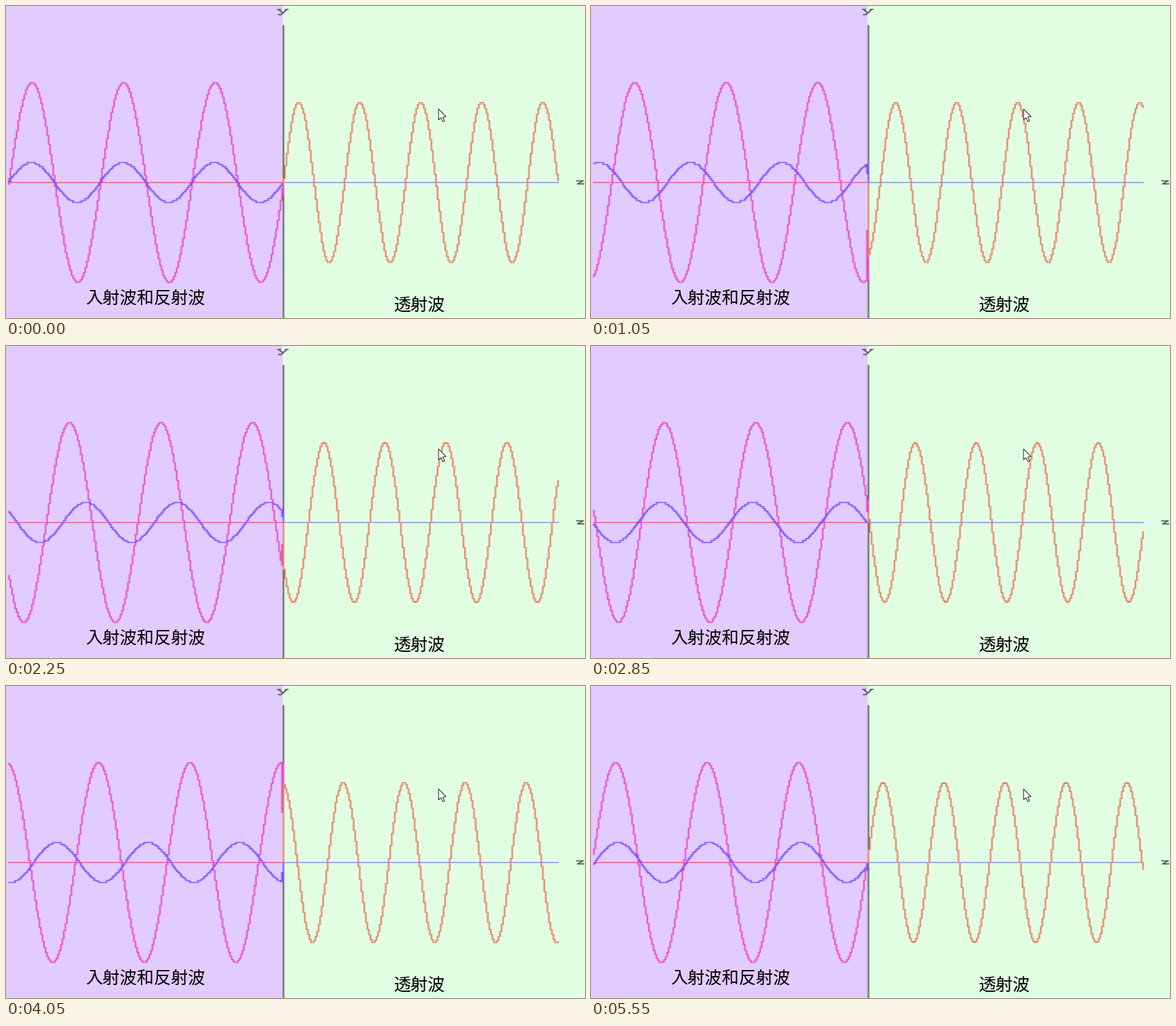
A matplotlib script that plays this animation: 846 px wide and 456 px high, repeating every 5.7 s.

```python
import numpy as np
import matplotlib.pyplot as plt
from matplotlib.animation import FuncAnimation
from matplotlib.patches import Polygon

W, H, DPI = 846, 456, 96
COLS, ROWS = 380, 312          # coarse plotting grid, enlarged to the stage
LEFT, MID, RIGHT = 1, 181, 361  # columns: start, interface, end
ZERO = 176                     # row of the z axis
TICKS, TICK_MS = 38, 150

PURPLE = (226, 203, 254)
GREEN = (226, 254, 226)
AXIS = (92, 112, 96)
RED = (232, 80, 128)
AXIS_BLUE = (122, 134, 222)
PINK = (232, 78, 204)
BLUE = (122, 84, 255)
ORANGE = (226, 130, 102)


def vline(img, col, a, b, color):
    lo, hi = sorted((int(round(a)), int(round(b))))
    img[lo:hi + 1, col] = color


def trace(img, first, rows, color):
    """Connect one row per column; each jump is split between neighbours."""
    mids = (rows[:-1] + rows[1:]) / 2
    before = np.concatenate(([rows[0]], mids))
    after = np.concatenate((mids, [rows[-1]]))
    for i, row in enumerate(rows):
        ends = (before[i], row, after[i])
        vline(img, first + i, min(ends), max(ends), color)


def wave(amp, length, count, phase):
    i = np.arange(count)
    return np.round(ZERO - amp * np.sin(2 * np.pi * (i / length - phase)))


def backdrop():
    img = np.empty((ROWS, COLS, 3), np.uint8)
    img[:, :MID] = PURPLE
    img[:, MID:] = GREEN
    img[19:, MID] = AXIS
    img[ZERO, LEFT:MID] = RED
    img[ZERO, MID + 1:RIGHT + 1] = AXIS_BLUE
    return img


def render(tick):
    # the picture holds on every third tick
    t = tick - (tick % 3 == 2)
    phase = 0.003 + 0.0277 * t - 0.00003 * t * t
    img = BASE.copy()
    n = MID - LEFT
    for amp, ph, color in ((100, phase, PINK), (20, -phase, BLUE)):
        rows = wave(amp, 60, n, ph)
        trace(img, LEFT, np.append(rows, ZERO), color)
        vline(img, MID, rows[-1], ZERO, color)
    rows = wave(80, 40, RIGHT - MID + 1, phase)
    trace(img, MID, rows, ORANGE)
    vline(img, MID, rows[0], ZERO, ORANGE)
    return img


BASE = backdrop()

fig = plt.figure(figsize=(W / DPI, H / DPI), dpi=DPI,
                 facecolor=np.array(PURPLE) / 255)
ax = fig.add_axes([0, 0, 1, 1])
ax.axis("off")
picture = ax.imshow(render(0), extent=(0.8, W + 0.8, H, 0),
                    interpolation="bilinear", aspect="auto")
ax.set_xlim(0, W)
ax.set_ylim(H, 0)


def px(size):
    return size * 72 / DPI


def stroke(points, width):
    x, y = zip(*points)
    ax.plot(x, y, color="#59645c", lw=px(width), solid_capstyle="butt")


# axis letters
stroke([(398, 5), (404.5, 10)], 2)
stroke([(410.5, 5), (402, 12.5), (397.5, 12.5)], 2)
stroke([(396, 5), (401.5, 5)], 1.5)
stroke([(407, 5), (412.5, 5)], 1.5)
stroke([(833, 255.5), (843.5, 255.5), (835, 260), (845, 260)], 1.8)

for x, y, label in ((204, 429, "入射波和反射波"), (603.5, 439, "透射波")):
    ax.text(x, y, label, family="Noto Sans CJK JP", fontsize=px(25),
            color="black", ha="center", va="center")

# mouse pointer
ax.add_patch(Polygon([(632, 150.5), (632, 166.5), (635.6, 163.2),
                      (638.2, 169), (640.8, 167.8), (638.3, 162.2),
                      (643, 161.6)],
                     facecolor="white", edgecolor="#333333", lw=px(1.1)))


def update(tick):
    picture.set_data(render(tick))
    return (picture,)


anim = FuncAnimation(fig, update, frames=TICKS, interval=TICK_MS,
                     repeat=True, repeat_delay=0, blit=False)
plt.show()
```
